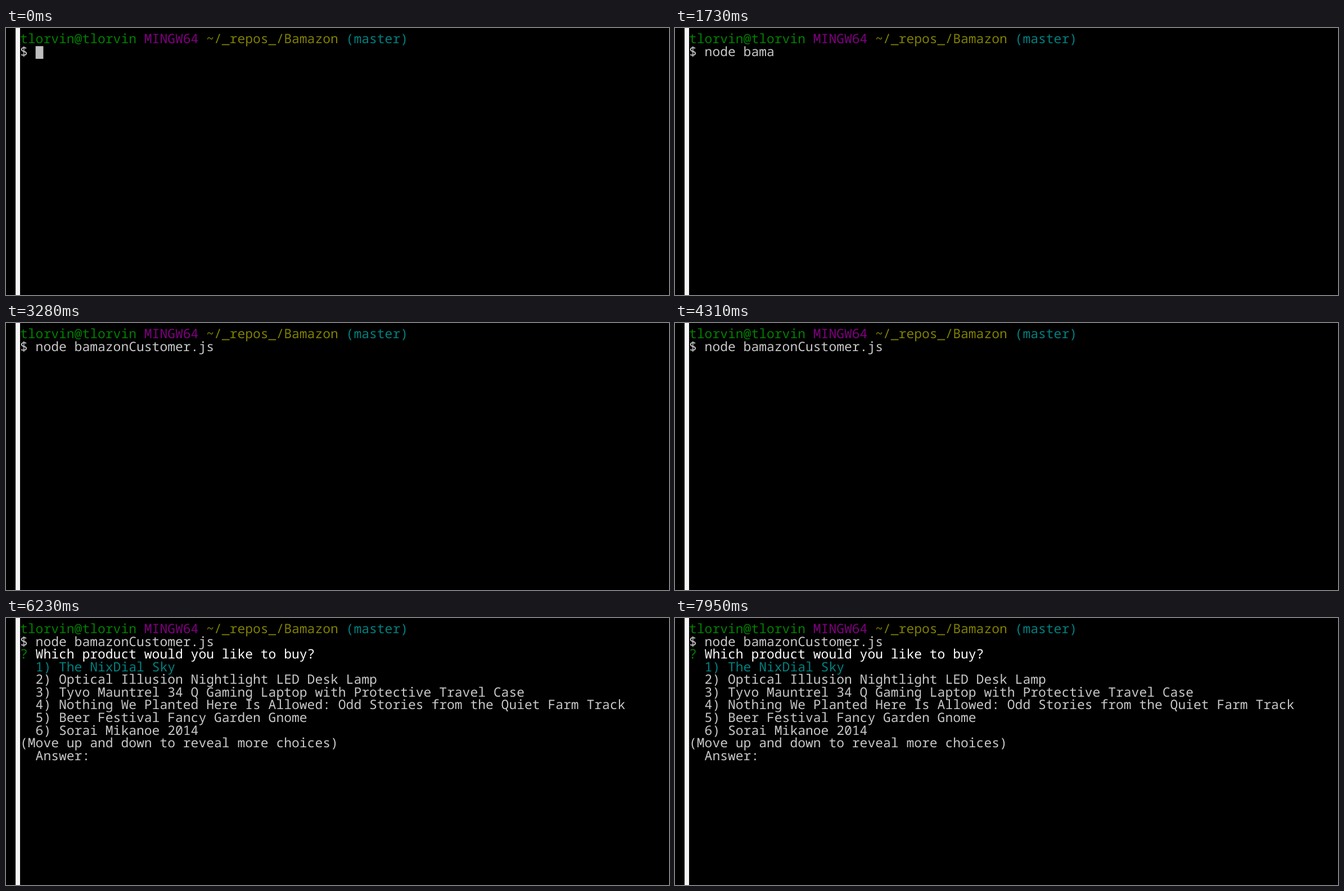
An HTML page that plays this animation: 1179x475 px, repeating every 8120 ms.

```html
<!DOCTYPE html>
<html lang="en">
<head>
<meta charset="utf-8">
<title>Terminal session</title>
<style>
  html, body { margin: 0; width: 100%; height: 100%; overflow: hidden; background: #000; }
  svg { display: block; width: 1179px; height: 475px; }
  text {
    font: 23px "Noto Sans Mono", monospace;
    white-space: pre;
    text-rendering: geometricPrecision;
  }
</style>
</head>
<body>
<svg id="stage" viewBox="0 0 1179 475">
  <rect width="1179" height="475" fill="#000"/>
  <rect x="17" width="8" height="475" fill="#f5f5f5"/>
</svg>
<script>
const LOOP = 8120;
const LEFT = 25, TOP = 9.7, BASELINE = 27;
const CELL = 13.8, LINE = 22.57;
const GREY = '#c8c8c8', GREEN = '#008000', PURPLE = '#800080', OLIVE = '#808000', TEAL = '#008080';

const stage = document.getElementById('stage');

function add(parent, tag, attrs) {
  const node = document.createElementNS(stage.namespaceURI, tag);
  for (const key in attrs) node.setAttribute(key, attrs[key]);
  return parent.appendChild(node);
}

function write(parent, row, col, content, fill = GREY) {
  const node = add(parent, 'text', { x: LEFT + col * CELL, y: BASELINE + row * LINE, fill });
  node.textContent = content;
  return node;
}

write(stage, 0, 0, 'tlorvin@tlorvin', GREEN);
write(stage, 0, 16, 'MINGW64', PURPLE);
write(stage, 0, 24, '~/_repos_/Bamazon', OLIVE);
write(stage, 0, 42, '(master)', TEAL);
write(stage, 1, 0, '$');
const command = write(stage, 1, 2, '');

const menu = add(stage, 'g', {});
write(menu, 2, 0, '?', GREEN);
write(menu, 2, 2, 'Which product would you like to buy?', '#fff');
[
  'The NixDial Sky',
  'Optical Illusion Nightlight LED Desk Lamp',
  'Tyvo Mauntrel 34 Q Gaming Laptop with Protective Travel Case',
  'Nothing We Planted Here Is Allowed: Odd Stories from the Quiet Farm Track',
  'Beer Festival Fancy Garden Gnome',
  'Sorai Mikanoe 2014'
].forEach((item, i) => write(menu, 3 + i, 2, `${i + 1}) ${item}`, i ? GREY : TEAL));
write(menu, 9, 0, '(Move up and down to reveal more choices)');
write(menu, 10, 2, 'Answer:');

const cursor = add(stage, 'rect', { width: CELL, height: LINE, fill: '#bfbfbf' });

// [start ms, typed command, cursor as [row, col] when lit]
const FULL = 'node bamazonCustomer.js';
const MENU_AT = 5150;
const steps = [
  [0, '', [1, 2]],
  [190, ''],
  [530, 'nod', [1, 5]],
  [700, 'node'],
  [1370, 'node b', [1, 8]],
  [1550, 'node bam', [1, 10]],
  [1730, 'node bama'],
  [2100, 'node bamazon', [1, 14]],
  [2240, 'node bamazon'],
  [2840, 'node bamazon', [1, 14]],
  [2940, 'node bamazoncu', [1, 16]],
  [3280, FULL],
  [3790, FULL, [1, 26]],
  [4130, FULL, [2, 0]],
  [4310, FULL],
  [5700, FULL, [10, 10]],
  [6230, FULL],
  [6740, FULL, [10, 10]],
  [7270, FULL],
  [7780, FULL, [10, 10]],
  [7950, FULL]
];

function draw(time) {
  const [, typed, spot] = steps.findLast(([start]) => start <= time);
  if (command.textContent !== typed) command.textContent = typed;
  menu.setAttribute('visibility', time >= MENU_AT ? 'visible' : 'hidden');
  cursor.setAttribute('visibility', spot ? 'visible' : 'hidden');
  if (spot) {
    cursor.setAttribute('x', LEFT + spot[1] * CELL);
    cursor.setAttribute('y', TOP + spot[0] * LINE);
  }
}

const begin = performance.now();
function tick() {
  draw((performance.now() - begin) % LOOP);
  requestAnimationFrame(tick);
}
tick();
</script>
</body>
</html>
```
